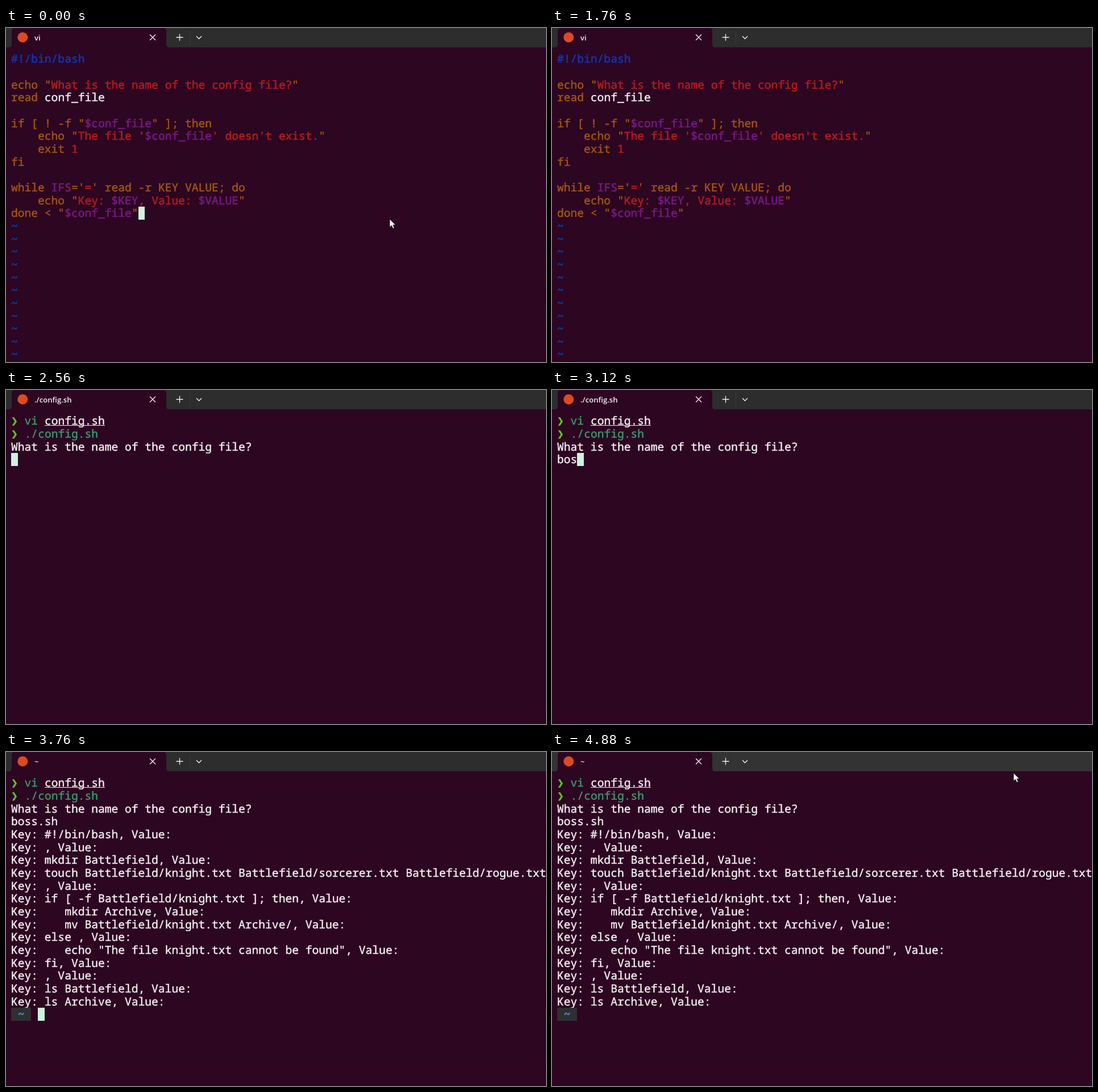
Animation, 950 px wide and 589 px high, one loop 4960 ms. Source, as an HTML page:

```html
<!DOCTYPE html>
<html lang="en">
<head>
<meta charset="utf-8">
<title>Terminal</title>
<style>
  html, body { margin: 0; width: 100%; height: 100%; overflow: hidden; background: #2d0622; }
  svg, pre, #title, #cursor { position: absolute; }
  svg { left: 0; top: 0; }
  #title { left: 50px; top: 7px; font: 600 13.1px/20px "Open Sans", sans-serif; color: #f6f2f4; }
  #cursor { width: 11.8px; height: 22.6px; background: #cdf3df; }
  pre {
    margin: 0; left: 9px; top: 43.4px; color: #f3eff1;
    font: 400 19.62px/22.66px "Noto Sans Mono", "DejaVu Sans Mono", monospace;
    -webkit-text-stroke: .45px;
    font-variant-ligatures: none; text-rendering: geometricPrecision;
  }
  u { text-decoration: underline 1.4px; text-underline-offset: 1px; text-decoration-skip-ink: none; }
  na, re, pu { -webkit-text-stroke-width: .7px }
  ti, pr, ar { font-weight: 700 }
  or { color: #a4570f }
  re { color: #b2191f }
  pu { color: #75197f }
  na { color: #0b36b6 }
  ti { color: #0d3f96 }
  gr { color: #3b9b6d }
  ar { color: #63c71f }
  gh { color: #7b7078 }
  pr { color: #4a92d6; background: #2f2f31; display: inline-block; height: 22.66px; vertical-align: top }
</style>
</head>
<body>
<svg width="950" height="589" fill="none" stroke="#f2f2f2" stroke-width="1.3">
  <path id="bar" d="M0 0H950V34H0Z" stroke="none"/>
  <path d="M5 34.5Q10 34 10 28V5Q10 1 14 0H278Q282 1 282 5V28Q282 34 287 34.5Z" fill="#2d0622" stroke="none"/>
  <circle cx="29.3" cy="16.5" r="9" fill="#dd4a20" stroke="none"/>
  <path d="M253 11.5l10 10m0-10l-10 10M299.5 16.5h12m-6-6v12M335 14.5l4.5 4.5 4.5-4.5"/>
  <path d="M323.5 4v26" stroke="#3b3b3b" stroke-width="1"/>
</svg>
<div id="title"></div>
<div id="cursor"></div>
<pre id="screen"></pre>
<svg width="950" height="589">
  <path id="mouse" d="M0 0V14.2L3.3 11.2 5.8 16.6 8.2 15.5 5.8 10.3H10.2Z" fill="#fff" stroke="#1a1018" stroke-width=".8"/>
</svg>
<script>
const LOOP = 4960, CELL = 11.772, ROW = 22.66, POINTER_IN = 4640;
const [title, cursor, screen, mouse, bar] =
  ["title", "cursor", "screen", "mouse", "bar"].map(id => document.getElementById(id));

const file = "<pu>$conf_file</pu>";
const editor = `<na>#!/bin/bash</na>

<or>echo "<re>What is the name of the config file?</re>"
read</or> conf_file
<or>
if [ ! -f "${file}" ]; then
    echo "<re>The file '${file}' doesn't exist.</re>"
    exit <re>1</re>
fi

while <pu>IFS</pu>='<re>=</re>' read -r KEY VALUE; do
    echo "<re>Key: <pu>$KEY</pu>, Value: <pu>$VALUE</pu></re>"
done &lt; "${file}"</or>
<ti>${"~\n".repeat(11)}</ti>`;

const prompt = "<pr> ~ </pr> ";
const opened = "<ar>❯</ar> <gr>vi</gr> <u>config.sh</u>\n";
const started = opened + "<ar>❯</ar> <gr>./config.sh</gr>\nWhat is the name of the config file?\n";
const command = "./config.sh", answer = "boss.sh";
const keys = [
  "#!/bin/bash", "", "mkdir Battlefield",
  "touch Battlefield/knight.txt Battlefield/sorcerer.txt Battlefield/rogue.txt", "",
  "if [ -f Battlefield/knight.txt ]; then", "   mkdir Archive",
  "   mv Battlefield/knight.txt Archive/", "else ",
  '   echo "The file knight.txt cannot be found"', "fi", "",
  "ls Battlefield", "ls Archive"
];
const output = started + answer + "\n" + keys.map(k => `Key: ${k}, Value:\n`).join("") + prompt;

// Each state: tab title, screen markup, cursor column and row (no column = hidden)
function state(t) {
  if (t < 1840) return ["vi", editor, t < 640 ? 19 : null, 12];
  if (t < 2480) {
    const n = t < 2160 ? 0 : t < 2240 ? 1 : t < 2400 ? 2 : command.length;
    const rest = n ? command.slice(n) : "";
    return ["~", `${opened}${prompt}<gr><u>${command.slice(0, n)}</u></gr><gh>${rest}</gh>`, 4 + n, 1];
  }
  if (t < 3760) {
    const n = Math.max(0, Math.min(answer.length, Math.floor((t - 2960) / 80) + 1));
    return ["./config.sh", started + answer.slice(0, n), n, 3];
  }
  return ["~", output, t < 4320 ? 4 : null, 18];
}

function pointer(t) {
  if (t < 320) return [675, 337];
  if (t < POINTER_IN) return null;
  const k = Math.min(3, Math.floor((t - POINTER_IN) / 80));
  return [818 - k * k * 2 / 3, 55 - k * 6];
}

let shown;
function draw() {
  const t = performance.now() % LOOP;
  const [name, text, col, row] = state(t);
  if (text !== shown) {
    screen.innerHTML = shown = text;
    title.textContent = name;
  }
  cursor.hidden = col === null;
  cursor.style.left = 9 + col * CELL + "px";
  cursor.style.top = 43.5 + row * ROW + "px";
  const at = pointer(t);
  mouse.setAttribute("visibility", at ? "visible" : "hidden");
  if (at) mouse.setAttribute("transform", `translate(${at})`);
  bar.setAttribute("fill", t < POINTER_IN ? "#2d2d2d" : "#333");
  requestAnimationFrame(draw);
}
draw();
</script>
</body>
</html>
```
